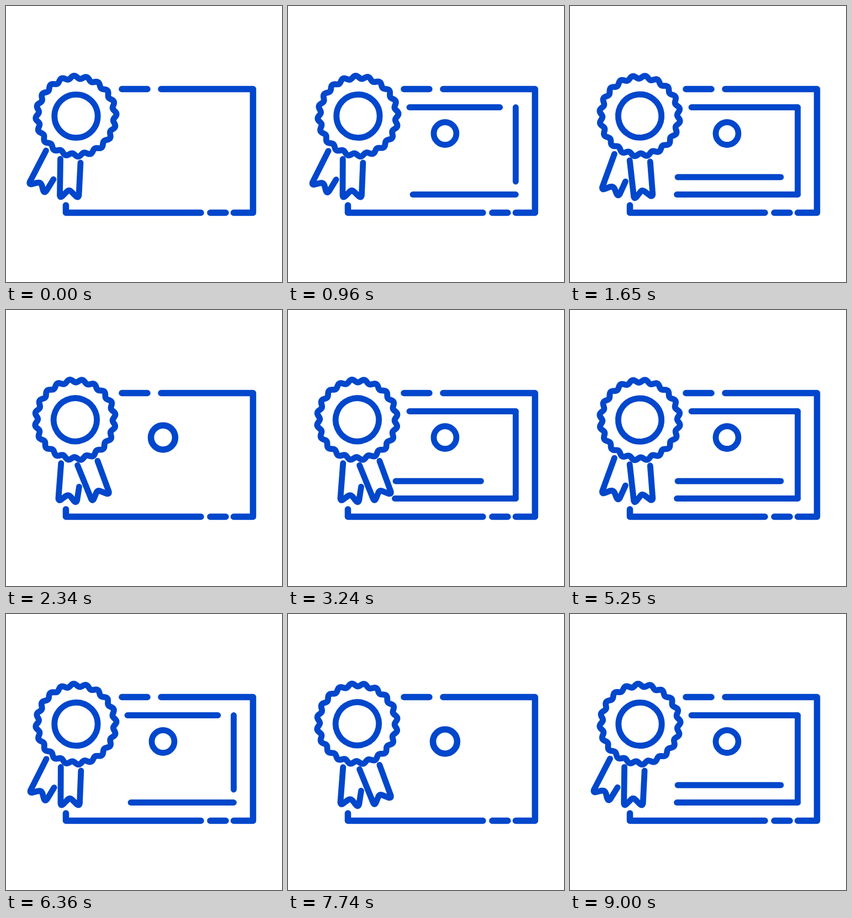
Animation of 500 by 500 pixels, one loop 9030 ms. Source, as an HTML page with a canvas:

```html
<!DOCTYPE html>
<html lang="en">
<head>
<meta charset="utf-8">
<title>Certificate</title>
<style>
  html, body { margin: 0; width: 100%; height: 100%; overflow: hidden; background: #fff; }
  canvas { display: block; width: 500px; height: 500px; }
</style>
</head>
<body>
<canvas id="stage" width="500" height="500"></canvas>
<script>
const ctx = document.getElementById('stage').getContext('2d');
const STEP = 30, TOTAL = 301, CYCLE = 60;

const frame = new Path2D(`M210 150.5H256 M281 150.5H447.5V374.5H412.5
  M398 374.5H370 M353 374.5H108.5V361`);
const ribbons = new Path2D(`M72.5 262L43 319Q42 324 47 322.5L57 320Q63 319 65 325L67 333
  Q69 340 73 335L86 314
  M98.5 277L97.5 343Q98 348 102 344.5L110 336.5Q114 332 118 336L127 345
  Q131 348 132 343L135 284`);
const rosette = makeRosette(127, 199.5, 20);

function makeRosette(cx, cy, teeth) {
  const path = new Path2D();
  const phase = -93 * Math.PI / 180;
  for (let i = 0; i < 360; i++) {
    const a = i * Math.PI / 180;
    const r = 70.5 + 2.8 * Math.cos(teeth * (a - phase));
    path.lineTo(cx + r * Math.cos(a), cy + r * Math.sin(a));
  }
  path.closePath();
  return path;
}

function ease(n, from, to) {
  const u = Math.min(1, Math.max(0, (n - from) / (to - from)));
  return u * u * (3 - 2 * u);
}

function ring(x, y, r) {
  ctx.beginPath();
  ctx.arc(x, y, r, 0, 2 * Math.PI);
  ctx.stroke();
}

// Draws the first part p of a line
function grow(p, x1, y1, x2, y2) {
  if (p <= 0) return;
  ctx.beginPath();
  ctx.moveTo(x1, y1);
  ctx.lineTo(x1 + (x2 - x1) * p, y1 + (y2 - y1) * p);
  ctx.stroke();
}

function drawBadge(n) {
  const swing = 12.35 * (1 - Math.cos(2 * Math.PI * n / 30));
  ctx.save();
  ctx.translate(124.5, 203);
  ctx.rotate(-swing * Math.PI / 180);
  ctx.translate(-124.5, -203);
  ctx.lineWidth = 10.8;
  ctx.stroke(rosette);
  ctx.stroke(ribbons);
  ring(127, 199.5, 39.2);
  ctx.restore();
}

function drawSeal(n) {
  const scale = 1.1 * ease(n, 4, 15) - 0.1 * ease(n, 15, 22);
  if (scale <= 0) return;
  ctx.save();
  ctx.translate(284.5, 231);
  ctx.scale(scale, scale);
  ring(0, 0, 20.5);
  ctx.restore();
}

function draw(n) {
  ctx.clearRect(0, 0, 500, 500);
  ctx.strokeStyle = '#0047cc';
  ctx.lineCap = ctx.lineJoin = 'round';
  ctx.lineWidth = 11.5;
  ctx.stroke(frame);
  drawBadge(n);
  ctx.lineWidth = 10.8;
  drawSeal(n);
  const border = ease(n, 17.5, 36);
  grow(border, 220, 183.5, 412.5, 183.5);
  grow(border, 412.5, 183.5, 412.5, 341.5);
  grow(border, 412.5, 341.5, 193.5, 341.5);
  grow(ease(n, 35, 52), 195, 310, 382, 310);
}

function tick() {
  const i = Math.floor(performance.now() / STEP) % TOTAL;
  draw(i ? (i - 1) % CYCLE + 0.5 : 0);
  requestAnimationFrame(tick);
}
tick();
</script>
</body>
</html>
```
